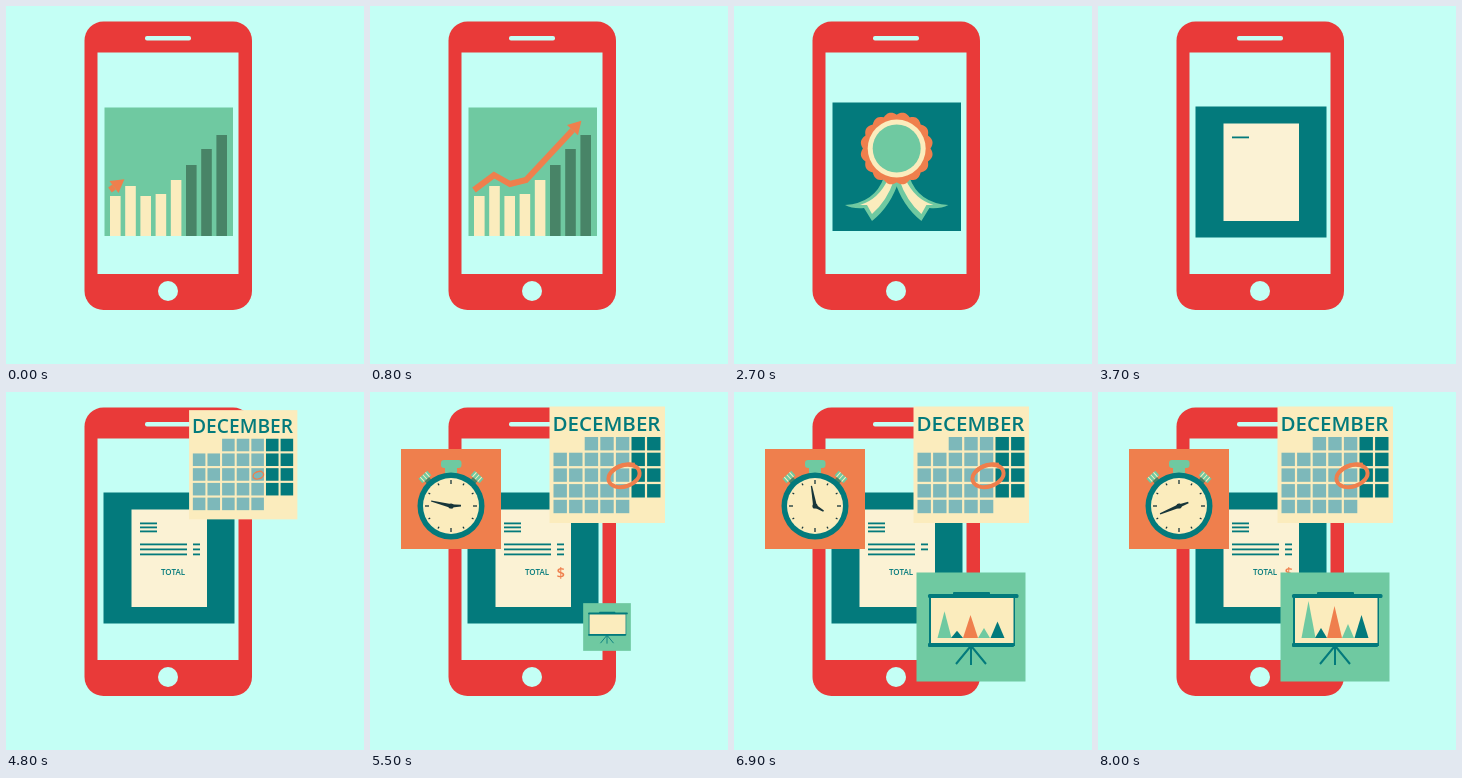
Recreate the animation shown at these times as an HTML page. Size 358 by 358 pixels, loop 8100 ms.

```html
<!DOCTYPE html>
<html lang="en">
<head>
<meta charset="utf-8">
<title>Business phone</title>
<style>
html, body { margin: 0; width: 100%; height: 100%; overflow: hidden; background: #c4fff5; }
svg { display: block; width: 100vw; height: 100vh; font-family: "Open Sans", Lato, sans-serif; }
.red { fill: #e93a39 } .sky { fill: #c4fff5 } .teal { fill: #037a7c } .cream { fill: #fbecbd }
.green { fill: #6fc9a1 } .orange { fill: #ef7f4d } .dark { fill: #488467 } .paper { fill: #fbf2d4 }
.pale { fill: #7db8ba } .ink { fill: #17353a }
.line { fill: none; stroke: #037a7c; stroke-width: 2 }
.mark { fill: none; stroke: #ef7f4d; stroke-width: 4 }
</style>
</head>
<body>
<svg viewBox="0 0 358 358">
  <rect class="red" x="78.5" y="15.5" width="167.5" height="288.5" rx="19"/>
  <rect class="sky" x="91.5" y="46.5" width="141" height="221.5"/>
  <rect class="sky" x="139" y="30" width="46" height="4.5" rx="2"/>
  <circle class="sky" cx="162" cy="285" r="10"/>

  <g id="chart">
    <rect class="green" x="98.5" y="101.5" width="128.5" height="128.5"/>
    <g id="bars"></g>
    <path id="trend" class="mark" style="stroke-width:6" d="M104 184 L124 169 L140 178 L156 174 L213 113"/>
    <path id="head" class="orange" d="M0 -7.5 L13 0 L0 7.5z"/>
  </g>

  <g id="award">
    <rect class="teal" x="98.5" y="96.5" width="128.5" height="128.5"/>
    <g id="tails">
      <g id="tail">
        <path class="green" d="M150 171 Q141 197 111 199 Q119 203 130 202 L138 215 Q157 200 165 174z"/>
        <path class="cream" d="M154 173 Q145 193 126 199 L133 199 L138 208 Q153 195 160 174z"/>
      </g>
      <use href="#tail" transform="translate(325.4) scale(-1 1)"/>
    </g>
    <g id="rosette">
      <path id="scallop" class="orange"/>
      <circle class="cream" cx="162.7" cy="142.5" r="29"/>
      <circle class="green" cx="162.7" cy="142.5" r="24"/>
    </g>
  </g>

  <g id="bill">
    <rect class="teal" x="97.5" y="100.5" width="131" height="131"/>
    <g id="sheet">
      <rect class="paper" x="125.5" y="117.5" width="75.5" height="97.5"/>
      <g id="rows"></g>
      <text id="total" class="teal" x="155" y="183" font-size="8" font-weight="600">TOTAL</text>
      <text id="sum" class="orange" x="186.5" y="185.5" font-size="15" font-weight="600">$</text>
    </g>
  </g>

  <g id="calendar">
    <rect class="cream" x="179.5" y="14.5" width="115.5" height="116.5"/>
    <text class="teal" x="236.5" y="39" font-size="20.5" font-weight="600" text-anchor="middle">DECEMBER</text>
    <g id="days"></g>
    <g id="ring">
      <g transform="rotate(-18 254 84)">
        <ellipse class="mark" cx="254" cy="84" rx="16" ry="10.5"/>
        <path class="mark" style="stroke-width:2.5" d="M240 78 Q252 68 268 76"/>
      </g>
    </g>
  </g>

  <g id="watch">
    <rect class="orange" x="31" y="57" width="100" height="100"/>
    <g id="knob" transform="rotate(-42 81 114)">
      <rect class="green" x="75" y="72" width="12" height="6"/>
      <path d="M77.5 72v6M81 72v6M84.5 72v6" stroke="#fbecbd"/>
      <rect class="dark" x="78" y="78" width="6" height="4"/>
    </g>
    <use href="#knob" transform="rotate(84 81 114)"/>
    <rect class="green" x="71" y="68" width="20.5" height="8" rx="3"/>
    <rect class="green" x="75" y="75" width="12" height="6"/>
    <circle class="teal" cx="81" cy="114" r="33.5"/>
    <circle class="cream" cx="81" cy="114" r="28"/>
    <g id="ticks"></g>
    <path id="hour" class="ink" d="M79.2 115 L80.2 104 L81.8 104 L82.8 115z"/>
    <path id="minute" class="ink" d="M79 116 L80.4 93.5 L81.6 93.5 L83 116z"/>
    <circle class="ink" cx="81" cy="114" r="2.6"/>
  </g>

  <g id="board">
    <rect class="green" x="182.5" y="180.5" width="109" height="109"/>
    <path class="line" d="M237 254V273M236 255L222 272M238 255L252 272"/>
    <rect class="teal" x="195" y="203" width="86" height="51"/>
    <rect class="cream" x="197" y="206" width="82.5" height="45"/>
    <rect class="teal" x="194" y="202" width="90.5" height="4" rx="1.5"/>
    <rect class="teal" x="219" y="200" width="37" height="4" rx="1"/>
    <rect class="teal" x="194" y="251" width="86" height="4" rx="1"/>
    <g id="peaks"></g>
  </g>
</svg>
<script>
const LOOP = 8100, STEP = 100;
const $ = id => document.getElementById(id);
const clamp = v => Math.max(0, Math.min(1, v));
const ramp = (t, start, length) => clamp((t - start) / length);
const easeOut = p => p * (2 - p);
const fill = (id, list, draw) => $(id).innerHTML = list.map(draw).join('');
const show = (id, on) => $(id).setAttribute('visibility', on ? 'inherit' : 'hidden');
const fade = (id, v) => $(id).setAttribute('opacity', v);
const rect = (c, x, y, w, h) => `<rect class="${c}" x="${x}" y="${y}" width="${w}" height="${h}"/>`;

function scale(id, x, y, sx, sy = sx) {
  show(id, sx > 0 && sy > 0);
  $(id).setAttribute('transform', `translate(${x} ${y}) scale(${sx} ${sy}) translate(${-x} ${-y})`);
}
const pop = (id, x, y, t, start, length = 600) => scale(id, x, y, easeOut(ramp(t, start, length)));

fill('bars', [190, 180, 190, 188, 174, 159, 143, 129], (y, i) =>
  rect(i < 5 ? 'cream' : 'dark', 104 + i * 15.2, y, 10.6, 230 - y));

$('scallop').setAttribute('d', 'M' + Array.from({ length: 320 }, (_, i) => {
  const a = i * Math.PI / 160, r = 33.8 + 2.6 * Math.abs(Math.sin(8 * a));
  return (162.7 + r * Math.cos(a)).toFixed(2) + ' ' + (142.5 + r * Math.sin(a)).toFixed(2);
}).join('L') + 'z');

// Bill lines: x, y, width, time of drawing
const rows = [0, 1, 2].flatMap(i => [
  [134, 130.5 + i * 4, 17, 3600 + i * 100],
  [134, 151.5 + i * 5, 47, 3900 + i * 100],
  [187, 151.5 + i * 5, 7, 4100 + i * 100]
]);
fill('rows', rows, ([x, y, w]) => rect('teal', x, y, w, 1.8));

fill('days', [...Array(35).keys()], i => {
  const col = i % 7, row = Math.floor(i / 7);
  if (row == 0 && col < 2 || row == 4 && col > 4) return '';
  return rect(col > 4 ? 'teal' : 'pale', 183.5 + col * 15.6, 45 + row * 15.7, 13.4, 13.4);
});

fill('ticks', [...Array(12).keys()], i =>
  `<path d="M81 88v${i % 3 ? 2 : 4}" stroke="#17353a" stroke-width="1.3" transform="rotate(${i * 30} 81 114)"/>`);

const peaks = [['green', 210.5, 7, 37], ['teal', 223, 6, 10], ['orange', 236.5, 7.5, 32],
  ['green', 250, 6, 14], ['teal', 263.5, 7, 23]];

function draw(t) {
  // Rising arrow
  const path = $('trend'), length = path.getTotalLength();
  const at = 5 + (length - 5) * ramp(t, 0, 900);
  const tip = path.getPointAtLength(at), back = path.getPointAtLength(at - 3);
  const angle = Math.atan2(tip.y - back.y, tip.x - back.x) * 180 / Math.PI;
  path.setAttribute('stroke-dasharray', `${at} ${length + 9}`);
  $('head').setAttribute('transform', `translate(${tip.x} ${tip.y}) rotate(${angle})`);

  // Award
  fade('chart', 1 - ramp(t, 900, 500));
  fade('award', t < 2800 ? ramp(t, 900, 500) : 1 - ramp(t, 2700, 400));
  pop('rosette', 162.7, 142.5, t, 1475);
  pop('tails', 162.7, 170, t, 2000);

  // Bill
  fade('bill', ramp(t, 2700, 400));
  pop('sheet', 163, 166, t, 3050, 550);
  [...$('rows').children].forEach((el, i) => {
    const [x, , w, start] = rows[i];
    const again = x > 180 && t >= 6700;
    el.setAttribute('width', w * ramp(t, again ? start + 2600 : start, 100));
  });
  show('total', t >= 4700);
  show('sum', t >= 5000 && t < 6700 || t >= 7300);

  // Cards
  pop('calendar', 237, 72.8, t, 4350);
  pop('ring', 253, 84, t, 4680);
  pop('watch', 81, 107, t, 4850);
  pop('board', 237, 235, t, 5350);
  const turn = (t - 5500) * 0.2807;
  $('minute').setAttribute('transform', `rotate(${284 + 2 * turn} 81 114)`);
  $('hour').setAttribute('transform', `rotate(${88 + turn} 81 114)`);
  const rise = ramp(t, 6000, 1250);
  fill('peaks', peaks, ([c, x, half, h]) =>
    `<path class="${c}" d="M${x - half} 246L${x} ${246 - h * rise}L${x + half} 246z"/>`);
}

function tick(now) {
  draw(Math.floor(now % LOOP / STEP) * STEP);
  requestAnimationFrame(tick);
}
draw(0);
requestAnimationFrame(tick);
</script>
</body>
</html>
```
